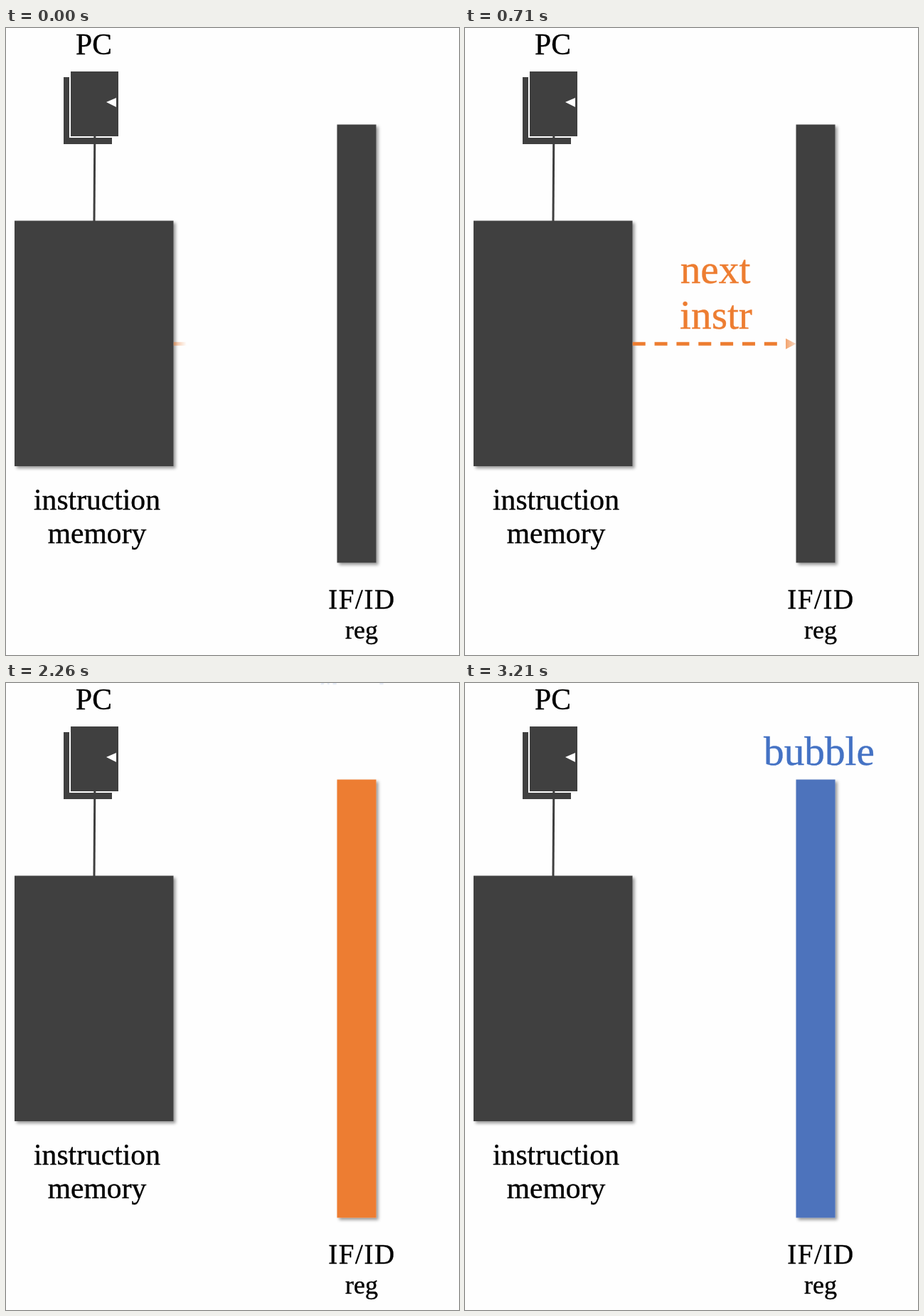
These frames come from a looping animation (637 px wide and 880 px high, 4.02 s). An HTML page:

```html
<!DOCTYPE html>
<html lang="en">
<head>
<meta charset="utf-8">
<title>Pipeline flush</title>
<style>
  html, body { margin: 0; width: 100%; height: 100%; overflow: hidden; background: #fefefe; }
  svg { display: block; width: 637px; height: 880px; }
  text { font-family: "Liberation Serif", serif; text-anchor: middle; stroke-width: .4; }
  .label { font-size: 41.6px; fill: #000; stroke: #000; }
  .big { font-size: 57.3px; }
  .orange { fill: #ed7d31; }
  .blue { fill: #4472c4; }
  text.orange { stroke: #ed7d31; }
  text.blue { stroke: #4472c4; }
</style>
</head>
<body>
<svg viewBox="0 0 637 880">
  <defs>
    <filter id="shadow" filterUnits="userSpaceOnUse" x="0" y="0" width="637" height="880">
      <feDropShadow dx="3" dy="3" stdDeviation="2" flood-color="#000" flood-opacity=".4"/>
    </filter>
    <linearGradient id="nextGrad" gradientUnits="userSpaceOnUse" y1="0" y2="0">
      <stop offset="0" stop-color="#fff"/><stop offset="1" stop-color="#000"/>
    </linearGradient>
    <linearGradient id="flushGrad" gradientUnits="userSpaceOnUse" x1="0" x2="0">
      <stop offset="0" stop-color="#fff"/><stop offset="1" stop-color="#000"/>
    </linearGradient>
    <mask id="nextMask" maskUnits="userSpaceOnUse" x="0" y="0" width="637" height="880" style="color-interpolation:sRGB;mask-type:luminance">
      <rect width="637" height="880" fill="url(#nextGrad)"/>
    </mask>
    <mask id="flushMask" maskUnits="userSpaceOnUse" x="0" y="-20" width="637" height="900" style="color-interpolation:sRGB;mask-type:luminance">
      <rect y="-20" width="637" height="900" fill="url(#flushGrad)"/>
    </mask>
  </defs>

  <rect width="637" height="880" fill="#fefefe"/>

  <g fill="#404040">
    <rect x="81" y="69" width="68" height="94"/>
    <rect x="90" y="60" width="69" height="93" stroke="#fff" stroke-width="2"/>
    <path d="M141 104L155 98V111Z" fill="#fff"/>
    <path d="M124.8 152L124 271" stroke="#404040" stroke-width="3"/>
    <rect x="12" y="270.5" width="223.5" height="344.5" filter="url(#shadow)"/>
    <rect id="bar" x="465.5" y="135.5" width="55" height="615" filter="url(#shadow)"/>
  </g>

  <g class="label">
    <text x="123.5" y="37">PC</text>
    <text x="128" y="676">instruction</text>
    <text x="128" y="723">memory</text>
    <text x="500.5" y="815" style="font-size:39px;letter-spacing:1.6px">IF/ID</text>
    <text x="500" y="857" style="font-size:36px">reg</text>
  </g>

  <g id="next" mask="url(#nextMask)">
    <text class="big orange" x="352" y="358">next</text>
    <text class="big orange" x="353" y="422">instr</text>
    <path d="M235.7 443.3H440" stroke="#ed7d31" stroke-width="5" stroke-dasharray="18 12.85"/>
    <path class="orange" d="M451 435.8L465.5 443.3L451 450.8Z"/>
  </g>

  <g id="flush" mask="url(#flushMask)">
    <text class="big blue" x="492.5" y="37">flush</text>
    <path d="M493.5 48.5V122" stroke="#4472c4" stroke-width="5" stroke-dasharray="12.7 5"/>
    <path class="blue" d="M486 121L501 121L493.5 135.5Z"/>
  </g>

  <text id="bubble" class="big blue" x="498" y="115">bubble</text>
</svg>
<script>
  const LOOP = 4020;
  const GREY = [64, 64, 64], ORANGE = [237, 125, 49], BLUE = [68, 114, 196];
  const el = id => document.getElementById(id);
  const ramp = (t, from, to) => Math.min(1, Math.max(0, (t - from) / (to - from)));
  const mix = (a, b, k) => `rgb(${a.map((v, i) => Math.round(v + (b[i] - v) * k))})`;

  // Soft-edged wipe: reveals between in0 and in1, erases between out0 and out1.
  function wipe(name, axis, t, w) {
    const leaving = t >= w.out0;
    const k = leaving ? ramp(t, w.out0, w.out1) : ramp(t, w.in0, w.in1);
    const lead = w.start + (w.end + w.soft - w.start) * k;
    const tail = lead - w.soft;
    const grad = el(name + "Grad");
    grad.setAttribute(axis + 1, leaving ? lead : tail);
    grad.setAttribute(axis + 2, leaving ? tail : lead);
    el(name).style.display = t < w.in0 || t >= w.out1 ? "none" : "";
  }

  const nextWipe = { start: 235, end: 466, soft: 33, in0: -60, in1: 790, out0: 940, out1: 1315 };
  const flushWipe = { start: 0, end: 136, soft: 20, in0: 2250, in1: 2745, out0: 2840, out1: 3205 };

  function draw(t) {
    wipe("next", "x", t, nextWipe);
    wipe("flush", "y", t, flushWipe);
    el("bar").setAttribute("fill", t < 2000
      ? mix(GREY, ORANGE, ramp(t, 915, 1345))
      : mix(ORANGE, BLUE, ramp(t, 2775, 3235)));
    el("bubble").setAttribute("opacity", ramp(t, 2840, 3200));
  }

  const began = performance.now();
  function tick() {
    draw((performance.now() - began) % LOOP);
    requestAnimationFrame(tick);
  }
  draw(0);
  requestAnimationFrame(tick);
</script>
</body>
</html>
```
